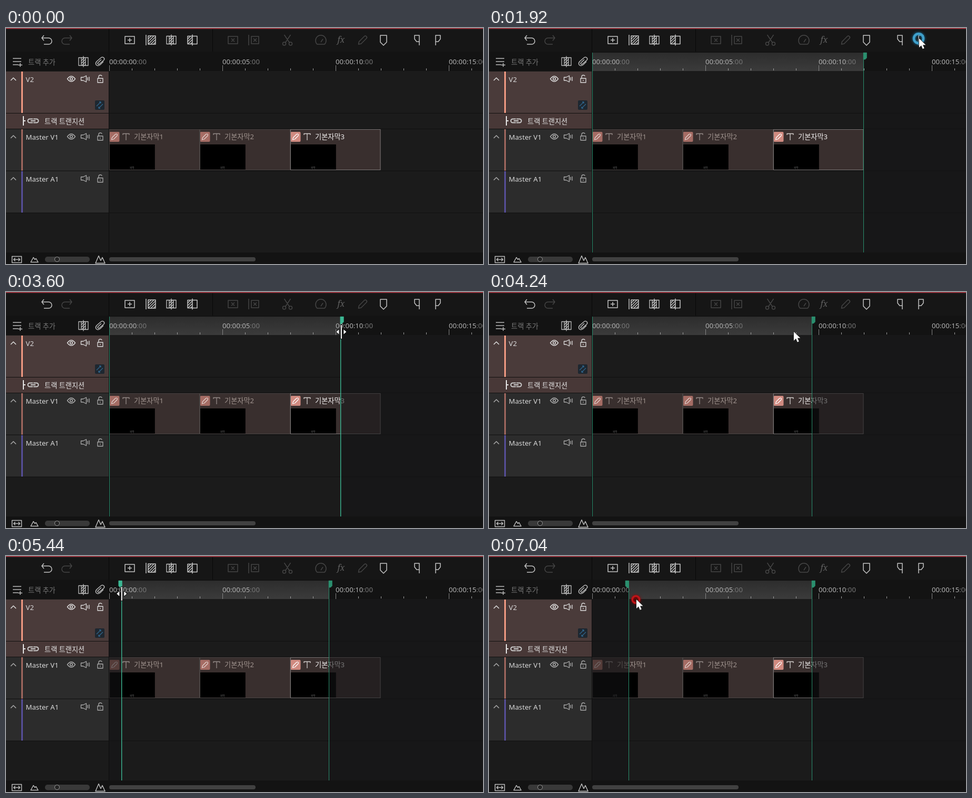
These frames come from a looping animation (906x450 px, 7.12 s). An HTML page with a canvas:

```html
<!DOCTYPE html>
<html lang="ko">
<head>
<meta charset="utf-8">
<title>Timeline range</title>
<style>
html, body { margin: 0; width: 100%; height: 100%; overflow: hidden; background: #1b1b1b; }
canvas { display: block; }
</style>
</head>
<body>
<canvas id="stage" width="906" height="450"></canvas>
<script>
const ctx = document.getElementById('stage').getContext('2d');
const LOOP = 7120, LEFT = 196, SECOND = 43;
const SANS = '"Noto Sans", "Noto Sans CJK KR", sans-serif';

function box(x, y, w, h, color) {
  ctx.fillStyle = color;
  ctx.fillRect(x, y, w, h);
}
function pill(x, y, w, h, r, color) {
  ctx.fillStyle = color;
  ctx.beginPath();
  ctx.roundRect(x, y, w, h, r);
  ctx.fill();
}
function text(s, x, y, color, font = '13.2px ' + SANS) {
  ctx.font = font;
  ctx.fillStyle = color;
  ctx.fillText(s, x, y);
}
// Draws an outline (and optional fill) with its origin at x, y.
function icon(path, x, y, color, width = 1.5, fill) {
  ctx.save();
  ctx.translate(x, y);
  const p = new Path2D(path);
  ctx.strokeStyle = color;
  ctx.lineWidth = width;
  ctx.lineJoin = 'round';
  ctx.stroke(p);
  if (fill) { ctx.fillStyle = fill; ctx.fill(p); }
  ctx.restore();
}
function hatch(x, y, w, h, color) {
  ctx.save();
  ctx.beginPath();
  ctx.rect(x, y, w, h);
  ctx.clip();
  for (let d = 1; d < w + h; d += 5) icon(`M0 ${d}L${d} 0`, x, y, color, 1.5);
  ctx.restore();
}

const PENCIL = 'M-8 8L-7 3 3-7Q5-9 7-7 9-5 7-3L-3 7Z';
const SMALL_PENCIL = 'M-5.5 5.5L-4.5 1.5 2-5Q3.5-6 5-5 6-3.5 5-2L-1.5 4.5Z';
const EYE = 'M-7.5 0Q0-10 7.5 0 0 10-7.5 0Z M2.4 0A2.4 2.4 0 1 1-2.4 0A2.4 2.4 0 1 1 2.4 0';
const SPEAKER = 'M-8-3H-4L2-6V6L-4 3H-8Z M4.5-3V3 M7.5-4V4';
const LOCK = 'M-5-1H5V7H-5Z M-3-1V-4Q-3-7 0-7 3-7 3-5 M0 2V4';
const UNDO = 'M-5-9L-9-4-5 1 M-9-4H4A6 6 0 0 1 4 8H-5';
const ARROW = 'M0 0V17L4 13.2 6.8 19.8 9.7 18.5 7 12.2H12.3Z';
const CROSS = 'M-3-3L3 3M3-3L-3 3';

function split(x, y, color) {
  icon('M-9-7H9V8H-9Z M-4-7V8 M4-7V8 M0-10V11', x, y, color, 1.3);
  hatch(x - 4, y - 7, 8, 15, color);
}

function toolbar() {
  const on = '#c4c4c4', off = '#454545';
  box(0, 0, 906, 45, '#161616');
  box(0, 0, 906, 1.6, '#ae3b46');
  box(195, 2, 1, 43, '#090909');
  box(392, 2, 1, 43, '#090909');
  icon(UNDO, 77, 23, on);
  ctx.save();
  ctx.scale(-1, 1);
  icon(UNDO, -116, 23, off);
  ctx.restore();
  icon('M-9-7H9V7H-9Z M0-4V4 M-4 0H4', 235, 23, on);
  icon('M-9-10V10 M-5-8H9V8H-5Z', 275, 23, on);
  hatch(270, 15, 14, 16, on);
  split(314, 22.5, on);
  icon('M-9-7H9V8H-9Z M0-10V11', 354, 22.5, on);
  hatch(345, 15, 9, 15, on);
  icon('M-9-7H9V7H-9Z' + CROSS, 431, 23, off);
  icon('M-11-10V10 M-6-7H8V7H-6Z', 472, 23, off);
  icon(CROSS, 473, 23, off);
  icon('M-6-10L4 5M6-10L-4 5 M-3 7A3 3 0 1 1-9 7A3 3 0 1 1-3 7 M9 7A3 3 0 1 1 3 7A3 3 0 1 1 9 7', 534.5, 23, off);
  icon('M-7 8A10 10 0 1 1 7 8Z M0 4L4-2', 598, 23, off);
  text('fx', 629.5, 28, '#606060', 'italic 16px "Noto Serif", serif');
  icon(PENCIL, 677.5, 23, off);
  icon('M-6-9H6V4L0 10-6 4Z', 717, 23, on);
  icon('M5 10V-9H-4V-2L0 3H5', 780, 23, on);
  icon('M-4 10V-9H5V-2L1 3H-4', 820, 23, on);
}

function trackHead(y, name, stripe, bg, color, hasEye) {
  box(0, y, 195, 79, bg);
  box(29, y, 3, 79, stripe);
  icon('M-5 3L0-2 5 3', 14, y + 14, color);
  text(name, 37.5, y + 20, '#d8d8d8');
  if (hasEye) icon(EYE, 124, y + 14, color);
  icon(SPEAKER, 150.5, y + 14, color, 1.3);
  icon(LOCK, 179, y + 14, color, 1.3);
}

function leftPanel() {
  box(0, 45, 195, 37, '#131313');
  icon('M-8-6H8 M-8 0H8 M-8 6H2 M6 3V10 M2 6.5H10', 21, 64, '#bbb');
  text('트랙 추가', 42, 70, '#777');
  split(147, 63.5, '#bbb');
  icon('M2-7L-6 0Q-9 4-6 7-3 9 1 6L7 0 M2-7Q5-10 8-7 10-4 7-2L-1 5Q-4 6-4 3L3-4', 178, 64, '#bbb');
  trackHead(83, 'V2', '#f39b83', '#4a3b3a', '#ddd', true);
  pill(169, 138, 18, 18, 2, '#1e2730');
  icon('M-6 2L2-6M-1-6H2V-3 M6-2L-2 6M1 6H-2V3', 178, 147, '#30648a', 1.3);
  box(0, 163, 195, 29, '#483837');
  icon('M0-9V9 M0 0H4', 33, 177, '#e6e6e6', 2);
  icon('M10-3.5H4A3.5 3.5 0 0 0 4 3.5H10 M11-3.5H17A3.5 3.5 0 0 1 17 3.5H11 M6 0H15', 41, 177, '#ccc', 2);
  text('트랙 트랜지션', 73, 183, '#e2e2e2');
  trackHead(193, 'Master V1', '#a1685f', '#2c2c2c', '#aaa', true);
  trackHead(273, 'Master A1', '#574f9b', '#2c2c2c', '#aaa', false);
  box(195, 45, 1, 383, '#0d0d0d');
}

function clip(n) {
  const x = LEFT + (n - 1) * 4 * SECOND, last = n === 3;
  box(x, 193, 171.5, 78, '#392f2e');
  pill(x + .5, 198, 19, 19, 2, last ? '#d08a80' : '#a56c64');
  icon(SMALL_PENCIL, x + 10, 207.5, last ? '#fff' : '#e3d2cf', 1.2);
  icon('M-6 2V-.5H6V2 M0-.5V12', x + 32, 202, last ? '#d2cdcc' : '#958b89', 1.3);
  text('기본자막' + n, x + 47, 212, last ? '#f3f1f1' : '#a0948f');
  box(x + .8, 222, 86, 48.5, '#000');
  text('자막', x + 39, 267.5, '#777', '4.5px ' + SANS);
  ctx.strokeStyle = last ? '#7a7575' : '#4a4443';
  ctx.lineWidth = 1;
  ctx.strokeRect(x + .5, 193.5, last ? 170.5 : 171, 77);
}

function timeline(range) {
  ctx.save();
  ctx.beginPath();
  ctx.rect(LEFT, 45, 906 - LEFT, 383);
  ctx.clip();
  box(LEFT, 45, 710, 37, '#131313');
  if (range) {
    const shade = ctx.createLinearGradient(0, 47, 0, 82);
    shade.addColorStop(0, '#2d2d2d');
    shade.addColorStop(1, '#3b3b3b');
    box(range.from, 47, range.to - range.from, 35, shade);
  }
  for (let s = 0; s < 17; s++) {
    const x = Math.round(LEFT + s * SECOND - .4), major = s % 5 === 0;
    box(x, major ? 71 : 77, 1, major ? 11 : 4, major ? '#858585' : '#a0a0a0');
    if (!major) continue;
    const label = '00:00:' + String(s).padStart(2, '0');
    text(label, x, 69, '#b2b2b2');
    text(':00', x + ctx.measureText(label).width, 69, '#777');
  }
  for (const n of [1, 2, 3]) clip(n);
  if (range) {
    const dim = 'rgba(20,20,22,.55)';
    box(LEFT, 82, range.from - LEFT, 346, dim);
    box(range.to, 82, 906 - range.to, 346, dim);
    edge(range.from, -1, range.dragFrom);
    edge(range.to, 1, range.dragTo);
  }
  ctx.restore();
}

function edge(x, side, active) {
  const color = active ? '#3cb894' : '#2a8f6e';
  box(Math.floor(x), 47, active ? 1.4 : 1, 381, color);
  icon(`M${-side * .5} 0H${side * 6}V10L${side * 3} 13H${-side * .5}Z`, x, 47, color, .5, color);
}

function bottomBar() {
  box(0, 428, 906, 22, '#131313');
  icon('M-9-6H9V6H-9Z M-6 0H6 M-3-3L-6 0-3 3 M3-3L6 0 3 3', 20.5, 441.5, '#bbb');
  icon('M-7 5L-2-4 1 0 3-2 7 5Z', 54, 441.5, '#bbb');
  pill(74, 436, 85, 10.5, 5, '#393939');
  icon('M4 0A4 4 0 1 1-4 0A4 4 0 1 1 4 0', 97, 441, '#b0b0b0', 1.6, '#252525');
  icon('M-9 7L-3-7 1 2 4-4 9 7Z', 179, 441.5, '#bbb');
  pill(LEFT, 437, 278, 8, 4, '#414141');
}

// Pointer stops: time, x, y
const STOPS = [
  [80, 870, 278], [720, 692, 129], [960, 692, 129], [1600, 817, 20],
  [2320, 817, 20], [2860, 713, 72], [3040, 713, 74], [3600, 637, 76],
  [3800, 615, 76], [4100, 615, 76], [4880, 197, 72], [5200, 197, 72],
  [5840, 257.5, 72], [5960, 265.5, 74], [6160, 265.5, 74], [6640, 280, 83], [LOOP, 280, 83]
];
const PRESSES = [800, 1600, 2880, 4880, 7040];
const RELEASES = [1040, 1840, 3880, 5760];
const DRAG_OUT = [3040, 3880], DRAG_IN = [5200, 5960];
const within = (t, [a, b]) => t >= a && t < b;

function pointerAt(t) {
  const i = STOPS.findIndex(stop => stop[0] > t);
  const [t0, x0, y0] = STOPS[i - 1], [t1, x1, y1] = STOPS[i];
  let k = (t - t0) / (t1 - t0);
  const dragging = within(t, DRAG_OUT) || within(t, DRAG_IN);
  if (!dragging) k = k * k * (3 - 2 * k);
  return { x: x0 + (x1 - x0) * k, y: y0 + (y1 - y0) * k };
}

function rangeAt(t, p) {
  if (t < 1840) return null;
  const dragTo = within(t, DRAG_OUT), dragFrom = within(t, DRAG_IN);
  return {
    dragTo, dragFrom,
    from: dragFrom ? Math.max(196, p.x) : t < DRAG_IN[0] ? 196 : 265,
    to: dragTo ? Math.max(613.5, p.x - 1.5) : t < DRAG_OUT[0] ? 711.5 : 613.5
  };
}

function ring(x, y, r, width, color, glow) {
  ctx.save();
  ctx.shadowColor = glow;
  ctx.shadowBlur = 5;
  ctx.strokeStyle = color;
  ctx.lineWidth = width;
  ctx.beginPath();
  ctx.arc(x, y, r, 0, 7);
  ctx.stroke();
  ctx.restore();
}

function pointer(t, p) {
  const resize = within(t, [2800, 4100]) || within(t, [5200, 6160]);
  const rx = p.x - (resize ? 19 : 1), ry = p.y - (resize ? 18 : 0);
  for (const start of PRESSES) {
    const k = (t - start) / 240;
    if (k < 0 || k >= 1) continue;
    pill(rx - 7, ry - 7, 14, 14, 7, 'rgba(90,0,0,.7)');
    ring(rx, ry, 6.8 - k, 3.5, '#c01418', '#900');
  }
  for (const start of RELEASES) {
    const k = (t - start) / 360;
    if (k < 0 || k >= 1) continue;
    ctx.globalAlpha = Math.min(1, 1.4 * (1 - k));
    ring(rx, ry, 7 + 9 * k, 5 - 2 * k, '#3f9fca', '#1b7fb0');
    ctx.globalAlpha = 1;
  }
  if (resize) {
    box(p.x - 2, p.y - 14, 4, 28, '#111');
    box(p.x - 1, p.y - 13, 2, 26, '#fff');
    icon('M-9.5 0L-4.5-4.5V4.5Z M9.5 0L4.5-4.5V4.5Z', p.x, p.y, '#111', 2, '#fff');
  } else {
    icon(ARROW, p.x, p.y, '#222', 1.5, '#fff');
  }
}

function draw(now) {
  const t = now % LOOP;
  const p = t < 80 ? null : pointerAt(t);
  box(0, 0, 906, 450, '#1b1b1b');
  toolbar();
  leftPanel();
  for (const y of [162, 192, 272, 352]) box(0, y, 906, 1, '#101010');
  timeline(rangeAt(t, p));
  bottomBar();
  if (p) pointer(t, p);
  requestAnimationFrame(draw);
}
requestAnimationFrame(draw);
</script>
</body>
</html>
```
